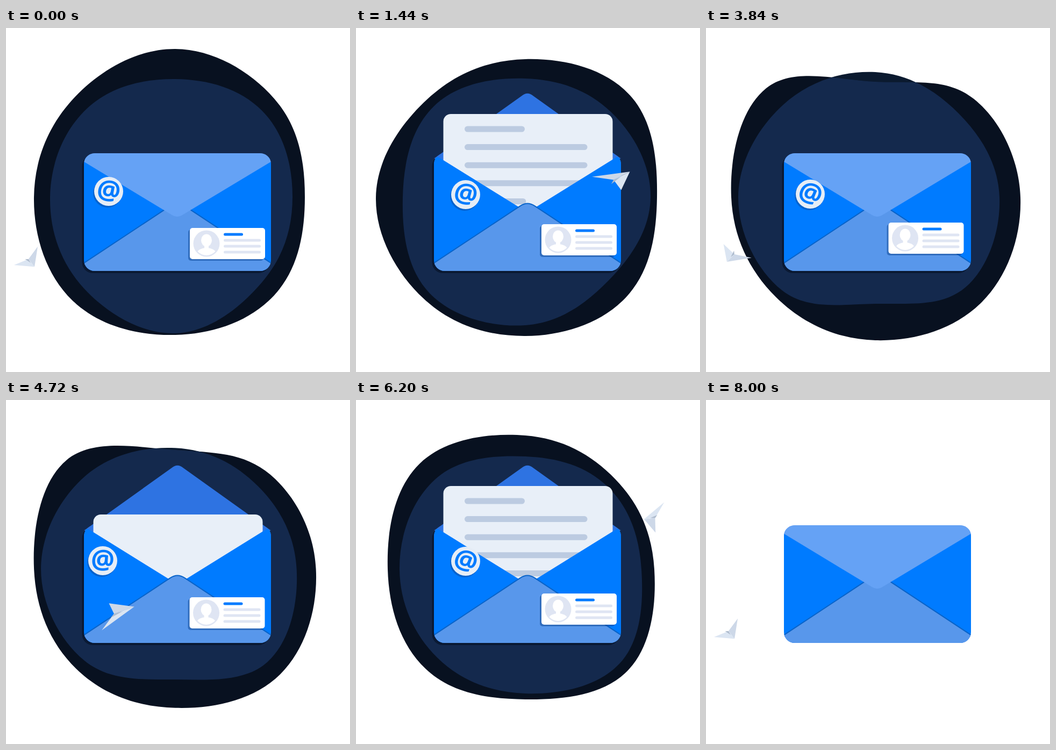
Animation of 640 by 640 pixels, one loop 8.04 s. Source, as an HTML page:

```html
<!DOCTYPE html>
<html lang="en">
<head>
<meta charset="utf-8">
<title>Mail</title>
<style>
html, body { margin: 0; width: 100%; height: 100%; overflow: hidden; background: #fff; }
svg { display: block; width: 100vw; height: 100vh; }
text { font: 700 49px "Open Sans", "Noto Sans", sans-serif; }
</style>
</head>
<body>
<svg viewBox="0 0 640 640">
  <defs>
    <path id="outer"/>
    <path id="inner"/>
    <clipPath id="inOuter"><use href="#outer"/></clipPath>
    <clipPath id="inBody"><rect x="145" y="233" width="348" height="219" rx="20"/></clipPath>
    <clipPath id="inAvatar"><circle cx="31" cy="29" r="22"/></clipPath>
  </defs>
  <g class="extra">
    <use href="#inner" fill="#0b1a2f"/>
    <use href="#outer" fill="#081120"/>
    <use href="#inner" fill="#14294d" clip-path="url(#inOuter)"/>
    <rect x="141.500" y="237" width="348" height="219" rx="20" fill="#061126" opacity=".65"/>
  </g>
  <g fill="#2e73e2">
    <path id="flapUp" d="M145 243L308 126.500Q319 117 330 126.500L493 243Z"/>
    <path d="M145 253A20 20 0 0 1 158 234.500L319 360 480 234.500A20 20 0 0 1 493 253Z"/>
  </g>
  <g id="letter">
    <rect x="162.500" y="160" width="315" height="185" rx="14" fill="#e8eff8"/>
    <g id="lines" fill="#bccbe1"></g>
  </g>
  <g clip-path="url(#inBody)">
    <path d="M145 254Q145 239 153 240L319 343 485 240Q493 239 493 254V452H145Z" fill="#007bff"/>
    <path d="M145 438.500L306 332Q319 323 332 332L493 438.500V460H145Z" fill="#5897eb"
      stroke="#0863c9" stroke-width="4" paint-order="stroke"/>
  </g>
  <path id="flapDown" d="M145.400 249A20 20 0 0 1 165 233H473A20 20 0 0 1 492.600 249L328 348Q318.500 354 309 348Z" fill="#65a2f5"/>
  <g class="extra">
    <g id="badge">
      <circle cx="-2" cy="3" r="27" fill="#0753ad" opacity=".6"/>
      <circle r="27" fill="#e6edf6"/>
      <text id="at" y="15" text-anchor="middle" fill="#007bff">@</text>
    </g>
    <g id="card">
      <rect x="-3" y="3" width="140" height="58" rx="5" fill="#0a4590" opacity=".5"/>
      <rect width="140" height="58" rx="5" fill="#fff"/>
      <circle cx="31" cy="29" r="24.500" fill="#dfe5f3"/>
      <g fill="#fff" clip-path="url(#inAvatar)">
        <ellipse cx="31" cy="23" rx="10" ry="11.500"/>
        <rect x="27" y="30" width="8" height="10"/>
        <ellipse cx="31" cy="46" rx="17" ry="9"/>
      </g>
      <rect x="63" y="9.500" width="36" height="5" rx="2.500" fill="#007bff"/>
      <path d="M65.500 23H129.500M65.500 34H129.500M65.500 45H129.500" stroke="#dfe5f3" stroke-width="5" stroke-linecap="round"/>
    </g>
  </g>
  <path id="leftWing" fill="#cdd8e8"/>
  <path id="rightWing" fill="#dbe5f2"/>
  <path id="keel" fill="#aebbcd"/>
</svg>
<script>
const LOOP = 8040, STEP = 40, CYCLE = 4000, END = 8000;
const $ = id => document.getElementById(id);
const { sin, cos, PI } = Math;

// each blob pose: eight radii, clockwise from the right
const BLOB_KEYS = [0, 1440, 3840, 6200];
const OUTER = [
  [241, 259, 256, 271, 263, 264, 276, 260],
  [245, 264, 258, 267, 278, 258, 257, 272],
  [270, 278, 266, 262, 268, 287, 215, 259],
  [240, 268, 242, 262, 256, 278, 249, 237]
];
const INNER = [
  [218, 226, 253, 240, 233, 233, 220, 228],
  [233, 219, 238, 252, 228, 240, 221, 225],
  [231, 237, 198, 245, 255, 243, 233, 220],
  [216, 248, 231, 232, 234, 237, 210, 217]
];

// drifting parts: x, y and the tilt of the badge
const DRIFT_KEYS = [0, 1440, 2840, 3840, 4720, 6200];
const BADGE = [[191, 304, 8], [204, 310, 12], [198, 309, 10], [194, 309, 20], [180, 299, 2], [204, 300, 18]];
const CARD = [[342, 372], [345, 365], [349, 360], [339.5, 362], [341.5, 367], [345, 360]];

const LINE_COUNT = 5;
const bars = Array.from({ length: LINE_COUNT }, (_, i) => {
  const bar = document.createElementNS("http://www.w3.org/2000/svg", "rect");
  const box = { x: 202, y: 182.5 + 33.6 * i, height: 11, rx: 5.5 };
  Object.entries(box).forEach(([k, v]) => bar.setAttribute(k, v));
  return $("lines").appendChild(bar);
});

// smooth periodic curve through timed rows of values
function curve(t, keys, rows) {
  const n = keys.length;
  const time = i => keys[(i + n) % n] + Math.floor(i / n) * END;
  const row = i => rows[(i + n) % n];
  let i = n - 1;
  while (keys[i] > t) i--;
  const t0 = time(i), d = time(i + 1) - t0, u = (t - t0) / d;
  const slope = (j, k) => (row(j + 1)[k] - row(j - 1)[k]) / (time(j + 1) - time(j - 1)) * d;
  const u2 = u * u, u3 = u2 * u;
  return row(i).map((a, k) =>
    (2 * u3 - 3 * u2 + 1) * a + (u3 - 2 * u2 + u) * slope(i, k) +
    (3 * u2 - 2 * u3) * row(i + 1)[k] + (u3 - u2) * slope(i + 1, k));
}

function blob(radii) {
  const n = radii.length, pull = 0.1875; // gives a true circle for equal radii
  const pt = radii.map((r, i) => [315 + r * cos(i * 2 * PI / n), 315 + r * sin(i * 2 * PI / n)]);
  const at = i => pt[(i + n) % n];
  let d = "M" + pt[0];
  for (let i = 0; i < n; i++) {
    const [p, a, b, q] = [at(i - 1), at(i), at(i + 1), at(i + 2)];
    const c1 = a.map((v, k) => v + (b[k] - p[k]) * pull);
    const c2 = b.map((v, k) => v - (q[k] - a[k]) * pull);
    d += `C${c1} ${c2} ${b}`;
  }
  return d + "Z";
}

function ramp(t, a, b) {
  const u = Math.min(1, Math.max(0, (t - a) / (b - a)));
  return u * u * (3 - 2 * u);
}

const move = (id, v) => $(id).setAttribute("transform", v);
const shape = (id, d) => $(id).setAttribute("d", d);

function flip(id, k) {
  $(id).style.display = k > 0 ? "" : "none";
  move(id, `translate(0 243) scale(1 ${k}) translate(0 -243)`);
}

function drawEnvelope(p) {
  const k = 1 - 2 * ramp(p, 120, 480) * (1 - ramp(p, 3440, 3780));
  flip("flapDown", k);
  flip("flapUp", -k);
  const up = ramp(p, 480, 1000) * (1 - ramp(p, 3000, 3480));
  move("letter", `translate(0 ${95 * (1 - up)})`);
  bars.forEach((bar, i) => {
    const start = 920 + i * 100;
    bar.setAttribute("width", (i ? 228.5 : 112) * ramp(p, start, start + 240));
  });
}

// circles an oval, nose along the path, foreshortened at both turns
function drawPlane(p) {
  const a = 2 * PI * p / CYCLE, s = sin(a), c = cos(a);
  const x = 307 - 262 * c + 18 * s, y = 328 + 106 * c + 23 * s;
  const heading = Math.atan2(23 * c - 106 * s, 262 * s + 18 * c);
  const length = 26 + 38 * s * s, half = 28 - 8 * s * s, skew = 19 * sin(2 * a);
  const hx = cos(heading), hy = sin(heading);
  const pt = (u, v) => `${x + u * hx + v * hy} ${y + u * hy - v * hx}`;
  const tri = (...pts) => "M" + pts.join("L") + "Z";
  const nose = pt(length / 2, 0), fold = pt(-0.2 * length, 0);
  shape("leftWing", tri(nose, fold, pt(skew - length / 2, half)));
  shape("rightWing", tri(nose, fold, pt(-skew - length / 2, -half)));
  shape("keel", tri(fold, pt(-0.35 * length, -5), pt(0.1 * length, -1)));
}

const extras = document.querySelectorAll(".extra");

function draw(t) {
  const s = t % END, p = t % CYCLE;
  extras.forEach(el => el.style.display = t < END ? "" : "none");
  shape("outer", blob(curve(s, BLOB_KEYS, OUTER)));
  shape("inner", blob(curve(s, BLOB_KEYS, INNER)));
  const [x, y, tilt] = curve(s, DRIFT_KEYS, BADGE);
  move("badge", `translate(${x} ${y})`);
  move("at", `rotate(${tilt})`);
  move("card", `translate(${curve(s, DRIFT_KEYS, CARD)})`);
  drawEnvelope(p);
  drawPlane(p);
}

const start = performance.now();
function tick() {
  const t = (performance.now() - start) % LOOP;
  draw(Math.floor(t / STEP) * STEP);
  requestAnimationFrame(tick);
}
tick();
</script>
</body>
</html>
```
